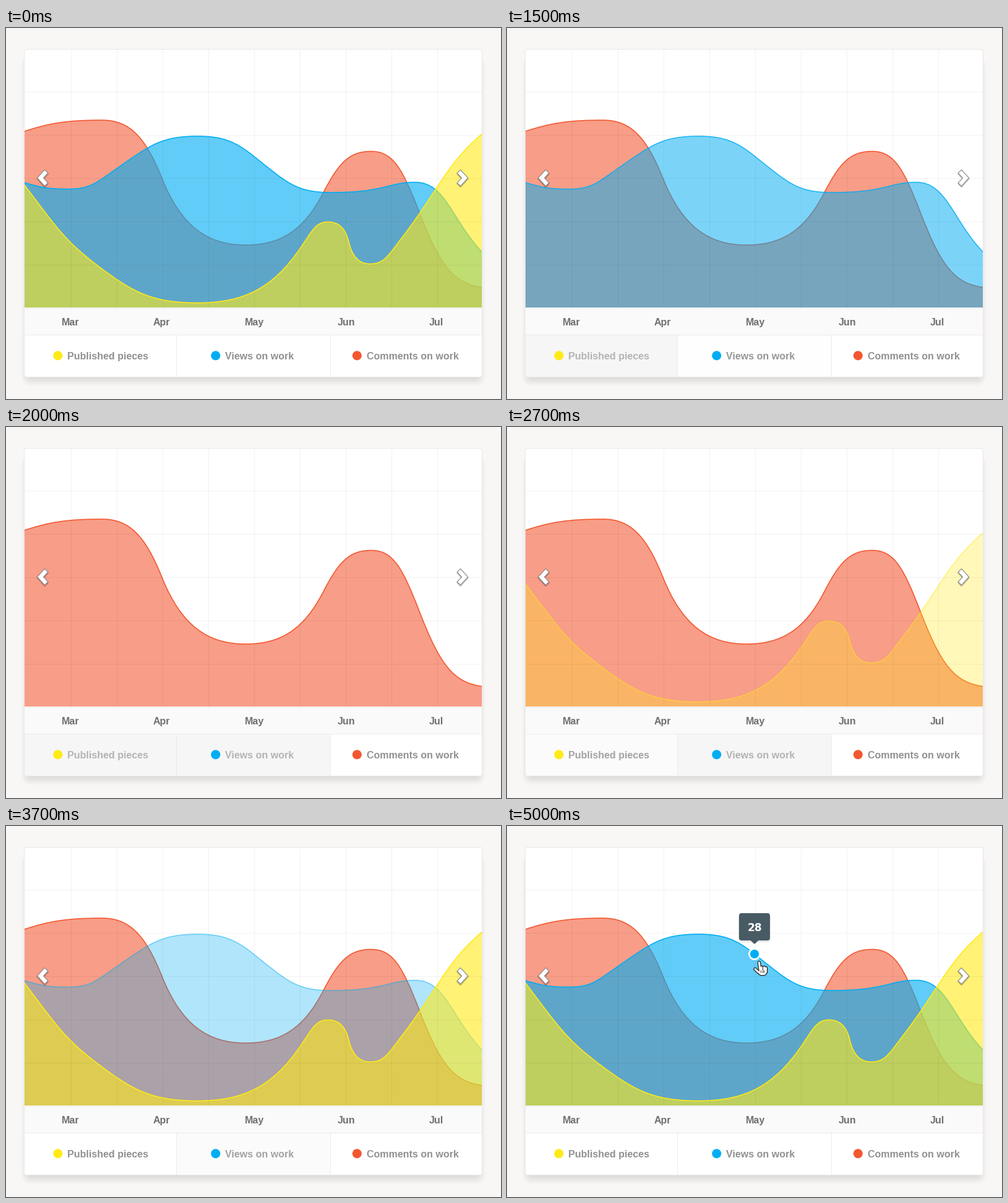
These frames come from a looping animation (800 px wide and 600 px high, 5.1 s). A matplotlib script:

```python
import numpy as np
import matplotlib.pyplot as plt
from matplotlib.animation import FuncAnimation
from matplotlib.patches import Circle, FancyBboxPatch, PathPatch, Polygon, Rectangle
from matplotlib.path import Path

W, H, DPI = 800, 600, 100
FRAMES, INTERVAL, STEPS = 51, 100, 6
LEFT, RIGHT, TOP, BASE, BOTTOM = 30, 769, 35, 452, 564


def pt(px):
    return px * 72 / DPI


def rgb(r, g, b):
    return r / 255, g / 255, b / 255


def gray(v):
    return rgb(v, v, v)


YELLOW, BLUE, RED = rgb(255, 234, 24), rgb(0, 173, 243), rgb(243, 87, 48)
SLATE = rgb(72, 91, 101)

fig = plt.figure(figsize=(W / DPI, H / DPI), dpi=DPI, facecolor=rgb(248, 247, 245))
ax = fig.add_axes([0, 0, 1, 1])
ax.set_xlim(0, W)
ax.set_ylim(H, 0)
ax.axis("off")


def add(patch, z):
    patch.set_zorder(z)
    return ax.add_patch(patch)


def box(x0, y0, x1, y1, r, z, **style):
    shape = FancyBboxPatch((x0, y0), x1 - x0, y1 - y0,
                           boxstyle=f"round,pad=0,rounding_size={r}", **style)
    return add(shape, z)


def shadow(x0, y0, x1, y1, blur, alpha, z):
    """Soft shadow from stacked boxes, each one pixel larger than the last."""
    return [box(x0 - s, y0 - s, x1 + s, y1 + s, blur + 1 + s, z,
                fc="black", ec="none", alpha=alpha) for s in range(-blur, blur)]


def line(xs, ys, color, z, width=1, alpha=1, cap="butt"):
    return ax.plot(xs, ys, color=color, lw=pt(width), alpha=alpha, zorder=z,
                   solid_capstyle=cap)[0]


def label(x, y, text, color, z=9, **kw):
    style = dict(family="Liberation Sans", weight="bold", fontsize=pt(16))
    style.update(kw)
    return ax.text(x, y, text, color=color, zorder=z, **style)


def smooth(nodes, reach=0.45, rise=0.73):
    """Cubic chain through (x, y, slope); steep handles are cut to a share of the rise."""
    pts = [nodes[0][:2]]
    for (x0, y0, s0), (x1, y1, s1) in zip(nodes, nodes[1:]):
        def handle(s):
            return min(reach * (x1 - x0), rise * abs(y1 - y0) / max(abs(s), 1e-6))
        a, b = handle(s0), handle(s1)
        pts += [(x0 + a, y0 + a * s0), (x1 - b, y1 - b * s1), (x1, y1)]
    return pts


class Area:
    """Translucent area below a smooth curve, with a solid top line."""

    def __init__(self, nodes, color, fill, z):
        pts = smooth(nodes)
        codes = [Path.MOVETO] + [Path.CURVE4] * (len(pts) - 1)
        closed = pts + [(RIGHT, BASE), (LEFT, BASE), pts[0]]
        self.fill = fill
        self.area = add(PathPatch(Path(closed, codes + [Path.LINETO] * 3),
                                  fc=color, ec="none"), z)
        self.line = add(PathPatch(Path(pts, codes), fc="none", ec=color,
                                  lw=pt(1.6), capstyle="butt"), z + 0.1)
        self.line.set_clip_path(Rectangle((LEFT, TOP), RIGHT - LEFT, BASE - TOP,
                                          transform=ax.transData))
        self.show(1)

    def show(self, level):
        self.area.set_alpha(self.fill * level)
        self.line.set_alpha(level)


class Key:
    """Legend cell with a background and text that dim when switched off."""

    def __init__(self, x0, x1, dot, text, color):
        self.back = add(Rectangle((x0, 496), x1 - x0, BOTTOM - 496.5, lw=0), 1)
        add(Circle((dot, 529.8), 7.5, fc=color, ec="none"), 9)
        self.text = label(dot + 15.3, 536, text, gray(145))
        self.show(1)

    def show(self, level):
        self.back.set_facecolor(gray(246 + 9 * level))
        self.text.set_color(gray(180 - 35 * level))


# Card
shadow(LEFT + 2, TOP + 18, RIGHT - 2, BOTTOM + 7, 9, 0.006, 0)
box(LEFT, TOP, RIGHT, BOTTOM, 4, 0.5, fc="white", ec="none")
add(Rectangle((LEFT, BASE), RIGHT - LEFT, 44, fc=gray(250), ec="none"), 1)
box(LEFT - 0.5, TOP - 0.5, RIGHT + 0.5, BOTTOM + 0.5, 4, 1.5,
    fc="none", ec=gray(232), lw=pt(1))

red = Area([(30, 167, -0.33), (155, 149, 0), (252, 243, 2.5), (387, 351, 0),
            (513, 266, -1.95), (590, 199.5, 0), (668, 298, 2.6),
            (769, 419.5, 0.15)], RED, 0.58, 2)
blue = Area([(30, 250, 0.3), (100, 260.5, 0), (178, 228, -0.7), (310, 175, 0),
             (400, 207, 0.8), (525, 266, 0), (615, 256.5, -0.24),
             (662, 249.5, 0), (769, 362, 1.05)], BLUE, 0.62, 3)
yellow = Area([(30, 254, 1.33), (149, 385, 0.76), (310, 444.5, 0),
               (475, 357, -1.45), (521, 313.5, 0), (554, 346, 4.4),
               (588, 381.5, 0), (640, 339, -1.3), (769, 171.5, -0.85)],
              YELLOW, 0.6, 4)

# Grid lies over the areas
for k in range(1, 10):
    line([LEFT + 74 * k + 0.5] * 2, [TOP, BASE], "black", 5, alpha=0.05)
for k in range(5):
    line([LEFT, RIGHT], [102.5 + 70 * k] * 2, "black", 5, alpha=0.05)

pieces = Key(LEFT, 275, 83.8, "Published pieces", YELLOW)
views = Key(275, 524, 338.8, "Views on work", BLUE)
Key(524, RIGHT, 567.3, "Comments on work", RED)

for y in (BASE + 0.5, 495.5):
    line([LEFT, RIGHT], [y, y], gray(235), 6)
for x in (274.5, 523.5):
    line([x, x], [496, BOTTOM], gray(235), 6)
for x, month in zip((104, 251.5, 401.5, 550.5, 695), "Mar Apr May Jun Jul".split()):
    label(x, 481, month, gray(112), ha="center")

# Paging arrows, mirrored left to right
chevron = np.array([(-9, 0), (3, -13.2), (8.3, -7.9), (1, 0), (8.3, 7.9), (3, 13.2)])
for x, side in ((59.5, 1), (737.5, -1)):
    shape = chevron * (side, 1) + (x, 242.5)
    for drop, width in ((1, 3), (1.5, 2)):
        add(Polygon(shape + (0, drop), fc="black", ec="black", lw=pt(width),
                    alpha=0.1, joinstyle="round"), 7)
    add(Polygon(shape, fc="white", ec=gray(140), lw=pt(1.1), joinstyle="round"), 8)

# Tooltip and marker
tip = shadow(376, 144, 424, 186, 4, 0.03, 10) + [
    box(375, 141, 425, 185, 4, 11, fc=SLATE, ec="none"),
    add(Polygon([(393.5, 185), (400, 191), (406.5, 185)], fc=SLATE, ec="none"), 11),
    label(400, 169.8, "28", "white", 12, ha="center",
          family="DejaVu Sans", fontsize=pt(17)),
    add(Circle((400, 207), 8.5, fc=BLUE, ec="white", lw=pt(2.8)), 12),
]

# Hand pointer: round strokes, drawn once wide and dark, once narrow and white
strokes = [([407.4, 409.5], [220.7, 236], 3), ([401, 407], [231.3, 237], 3),
           ([411, 414.5], [236.7, 236.7], 8)]
strokes += [([x, x], [227.5 + 0.9 * k, 236], 3)
            for k, x in enumerate((411.3, 414.6, 417.6))]
for color, grow, z in ((gray(90), 4, 12.5), (gray(30), 2.2, 13), ("white", 0, 14)):
    alpha = 0.25 if z == 12.5 else 1
    for xs, ys, width in strokes:
        tip.append(line(xs, ys, color, z, width + grow, alpha, "round"))
for k in range(3):
    tip.append(line([410 + 2.7 * k] * 2, [232.5, 237], gray(30), 15, 0.9))
tip = [(artist, artist.get_alpha() or 1) for artist in tip]


def fade(i, start):
    return min(max((i - start + 1) / STEPS, 0), 1)


def update(i):
    for area, key, off, on in ((yellow, pieces, 5, 25), (blue, views, 15, 35)):
        level = 1 - fade(i, off) + fade(i, on)
        area.show(level)
        key.show(level)
    for artist, full in tip:
        artist.set_alpha(full * fade(i, 45))
    return []


anim = FuncAnimation(fig, update, frames=FRAMES, init_func=lambda: update(0),
                     interval=INTERVAL, repeat=True, repeat_delay=0, blit=False)
plt.show()
```
